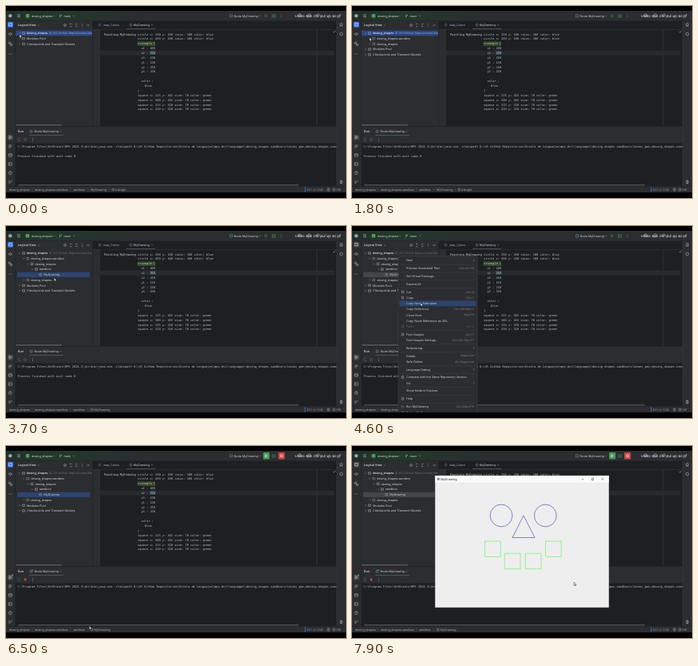
Animation, 426 px wide and 240 px high, one loop 8000 ms. Source, as an HTML page:

```html
<!DOCTYPE html>
<html lang="en">
<head>
<meta charset="utf-8">
<title>Shape editor session</title>
<style>
  html, body { margin: 0; width: 100%; height: 100%; overflow: hidden; background: #000; }
  svg { display: block; width: 100vw; height: 100vh; }
  text { font-family: Inter, Roboto, sans-serif; white-space: pre; text-rendering: geometricPrecision; }
  .mono { font-family: "DejaVu Sans Mono", "Noto Sans Mono", monospace; }
</style>
</head>
<body>
<svg id="stage" viewBox="0 0 426 240" preserveAspectRatio="none"></svg>
<script>
const LOOP = 8000, STEP = 100;
const PANEL = '#2b2d30', EDITOR = '#1e1f22', LINE = '#393b40';
const TEXT = '#cfd1d6', DIM = '#7d8087', GREEN = '#57a865', SOFT_GREEN = '#55805f';
const BLUE = '#2b4784', ROW_BLUE = '#2e436e', GRAY_SEL = '#43454a', ACCENT = '#3574f0', TAB = '#5b6472';

// Markup helpers; text is placed by its vertical centre.
const rect = (x, y, w, h, fill, extra = '') =>
  `<rect x="${x}" y="${y}" width="${w}" height="${h}" fill="${fill}" ${extra}/>`;
const path = (d, color = '#a9abb1', width = .6, extra = '') =>
  `<path d="${d}" fill="none" stroke="${color}" stroke-width="${width}" ${extra}/>`;
const dot = (x, y, r, fill) => `<circle cx="${x}" cy="${y}" r="${r}" fill="${fill}"/>`;
const ring = (x, y, r, color = '#a9abb1') =>
  `<circle cx="${x}" cy="${y}" r="${r}" fill="none" stroke="${color}" stroke-width=".6"/>`;
const text = (x, y, s, fill = TEXT, size = 3.7, extra = '') =>
  `<text x="${x}" y="${y + size * .36}" font-size="${size}" fill="${fill}" ${extra}>${s}</text>`;
const mono = (x, y, s, fill = '#bcbec4') => text(x, y, s, fill, 3.67, 'class="mono"');
const frame = (x, y, w = 4, h = 3.4, color) =>
  path(`M${x - w / 2} ${y - h / 2}h${w}v${h}h${-w}z`, color);
const chevron = (x, y, down, color = '#9a9ca3') =>
  path(down ? `M${x - 1.1} ${y - .5}l1.1 1.1 1.1 -1.1` : `M${x - .5} ${y - 1.1}l1.1 1.1 -1.1 1.1`, color, .5);
const dots = (x, y) => [-1.5, 0, 1.5].map(d => dot(x, y + d, .4, '#b5b7bd')).join('');
const play = (x, y) => path(`M${x - 1.3} ${y - 1.8}l3 1.8 -3 1.8z`, SOFT_GREEN);

function chrome() {
  let s = `<defs><linearGradient id="bar">
    <stop offset="0" stop-color="#232d28"/><stop offset=".12" stop-color="#22392b"/>
    <stop offset=".4" stop-color="${PANEL}"/></linearGradient>
    <clipPath id="side"><rect x="12" y="30" width="96" height="120"/></clipPath>
    <clipPath id="view"><rect x="0" y="6" width="426" height="227"/></clipPath>
    <clipPath id="log"><rect x="12" y="172" width="402" height="53"/></clipPath></defs>`;
  s += rect(0, 6, 426, 227, PANEL) + rect(0, 6, 426, 12.5, 'url(#bar)');
  s += rect(109, 19, 305, 10, EDITOR) + rect(118, 29, 296, 121, EDITOR) + rect(12, 171.5, 402, 53.5, EDITOR);
  s += rect(0, 18.3, 426, .5, EDITOR) + rect(11.4, 18.5, .5, 206.5, EDITOR) +
       rect(414, 18.5, .5, 206.5, LINE) + rect(108.4, 18.5, .6, 131.5, EDITOR) +
       rect(12, 150, 402, .6, EDITOR) + rect(0, 225, 426, .5, EDITOR) +
       rect(109, 29, 305, .4, LINE) + rect(389.3, 29.4, .6, 120.6, LINE);

  // Title bar
  s += dot(5.3, 12.3, 2.2, '#8fa8b8');
  s += path('M14 10.7h4M14 12.3h4M14 13.9h4', '#c5c7cc', .5);
  s += rect(24.7, 10, 4.6, 4.6, '#4c9a63', 'rx="1"') + text(32, 12.3, 'desing_shapes') + chevron(60, 12.3, true);
  s += path('M67.5 10.5v4M69.5 10.5v1.5l-2 1') + text(72.5, 12.3, 'main') + chevron(85, 12.3, true);
  s += frame(282, 12.3, 3, 3, '#6a8fb5') + text(285.5, 12.3, 'Node MyDrawing') + chevron(318, 12.3, true);
  s += ring(335.5, 12.5, 1.6, GREEN) + path('M333 11h1M337 11h1M333 14h1M337 14h1', GREEN);
  s += ring(368, 11.5, 1.7) + ring(380, 11.5, 1.7) + ring(391, 11.5, 1.6);
  s += text(362, 12.8, 'video eps chr pul up ao pf', '#f4f4f4', 4.7);

  // Tool stripes
  s += ring(5.3, 35, 1.4) + path('M2.6 35h1.3M6.7 35h1.3');
  s += frame(4.4, 46.2, 2, 2) + frame(6.5, 48.5, 2, 2);
  s += [3.8, 5.3, 6.8].map(x => dot(x, 60, .4, '#b5b7bd')).join('');
  s += rect(2, 160.7, 7, 7, GRAY_SEL, 'rx="1.4"') + path('M4.2 162.2l3 1.9 -3 1.9z', '#d5d7dc');
  s += path('M3.3 174h4M3.3 175.5h4M3.3 177h2.5') + frame(5.3, 186.5) + path('M3.3 186h4') +
       frame(5.3, 197.5) + path('M4 196.7l1 .8 -1 .8') + ring(5.3, 208.7, 1.9) + path('M5.3 207.3v1.7') +
       path('M4 218v4M6.8 218v1.5l-2.6 1.5');
  s += ring(420, 23, 1.5) + path('M418 25h4') + ring(420, 35, 1.8) + frame(420, 220, 2, 3.2, '#d5d7dc');

  // Project header and editor tabs
  s += text(15, 24, 'Logical View', TEXT, 3.7, 'font-weight="600"') + chevron(41, 24, true);
  s += ring(74, 24, 1.4) + path('M80 23l1.2 -1.2 1.2 1.2M80 25l1.2 1.2 1.2 -1.2') +
       path('M87 22l1.2 1.2 1.2 -1.2M87 26l1.2 -1.2 1.2 1.2') + dots(95.5, 24) + path('M101.5 24h3');
  s += rect(12, 148, 58, 1.8, '#505257', 'rx=".8"');
  s += ring(117.5, 23.7, 1.4, '#6485ae') + text(122, 23.7, 'map_Canvo', '#a5a8af');
  s += ring(156.5, 23.7, 1.4, '#8a8d94') + text(159.8, 23.7, 'MyDrawing') +
       path('M182 22.7l2 2M184 22.7l-2 2', DIM, .4) + rect(151, 28.2, 36, .7, TAB);
  return s + source() + path('M410 32l1 1.2 2 -2.6', GREEN, .7);
}

function source() {
  const circle = x => `circle x: ${x} y: 100 raius: 100 color: blue`;
  const square = (x, y) => `square x: ${x} y: ${y} size: 70 color: green`;
  const points = ['x1 : 400', 'x2 : 350', 'x3 : 450', 'y1 : 150', 'y2 : 250', 'y3 : 250'];
  const rows = [circle(250), circle(450), 'triangle {', ...points.map(p => '  ' + p), '',
    '  color :', '    blue', '}', square(225, 265), square(500, 265), square(315, 320), square(410, 320)];
  let s = rect(118, 55.7, 293, 5.8, '#262a2f') + rect(164.6, 44.4, 22.4, 5.6, '#35472f') +
          rect(180.2, 56, 7.2, 5, '#36464f');
  s += mono(123, 35.2, 'Painting MyDrawing', '#d6d8dd');
  rows.forEach((r, i) => s += mono(165, 35.2 + 5.87 * i, r, i === 2 ? '#c8d79a' : undefined));
  return s;
}

function tree(t, focused) {
  const open = [700, 2000, 2500, 3000].map(at => t >= at);
  const picked = t >= 3400;
  const rows = [[0, 'desing_shapes', open[0]]];
  if (open[0]) rows.push([1, 'desing_shapes.sandbox', open[1]]);
  if (open[1]) rows.push([2, 'desing_shapes', open[2]]);
  if (open[2]) rows.push([3, 'sandbox', open[3]]);
  if (open[3]) rows.push([4, 'MyDrawing', null]);
  if (open[0]) rows.push([1, 'desing_shapes', false]);
  rows.push([0, 'Modules Pool', false], [0, 'Checkpoints and Transient Models', false]);
  let s = '';
  rows.forEach(([level, label, expanded], i) => {
    const x = 17 + 5.3 * level, y = 34 + 6.7 * i;
    if (!picked && i === 0) s += rect(12, y - 3.3, 96, 6.6, BLUE);
    if (picked && level === 4) s += rect(14, y - 3.1, 91, 6.2, focused ? ROW_BLUE : GRAY_SEL, 'rx="1"');
    if (expanded !== null) s += chevron(x, y, expanded);
    s += level === 4 ? ring(x + 5, y, 1.4) : frame(x + 5, y, 2.8, 2.4, level === 1 ? '#a98a78' : undefined);
    s += i ? text(x + 9, y, label)
      : text(x + 8.7, y, `<tspan font-weight="600">${label}</tspan><tspan fill="${picked ? '#6a6d74' : '#93a3c6'}"> (D:\\VS GitHub Repositories\\desing_shapes)</tspan>`);
  });
  return `<g clip-path="url(#side)">${s}</g>`;
}

function toolbar(running, focused) {
  let s = rect(2, 19.7, 7, 7, focused ? ACCENT : GRAY_SEL, 'rx="1.4"') + frame(5.5, 23.2, 3.6, 3, '#e4e6ea');
  if (running) {
    s += rect(322.2, 8, 8, 8.4, '#4b9a59', 'rx="1.2"') + path('M325 10.6l2.6 1.7 -2.6 1.7z', '#fff');
    s += rect(341.2, 8, 8, 8.4, '#d04a4c', 'rx="1.2"') + frame(345.2, 12.3, 2.4, 2.4, '#fff');
  } else s += play(326, 12.3) + dots(345, 12.3);
  return s;
}

function runPanel(running) {
  const command = 'C:\\Program Files\\JetBrains\\MPS 2024.3\\jbr\\bin\\java.exe -classpath D:\\VS GitHub Repositories\\Escola de Lenguajes\\mps.dsl\\languages\\desing_shapes.sandbox\\classes_gen;desing_shapes.sandbox';
  let s = text(15, 156.7, 'Run', TEXT, 3.7, 'font-weight="600"');
  s += frame(31.5, 156.7, 2.6, 2.6, '#6a8fb5') + text(35.5, 156.7, 'Node MyDrawing') +
       path('M67.5 155.7l2 2M69.5 155.7l-2 2', DIM, .4) + rect(29, 161.2, 43, .7, TAB);
  s += path('M18 165.7a1.8 1.8 0 1 0 .3 2', SOFT_GREEN) + dots(33.5, 167);
  s += running ? rect(22.7, 165.6, 2.8, 2.8, '#b04a4a', 'rx=".5"') : frame(24, 167, 2.6, 2.6, '#66696f');
  if (running) s += dot(33, 155, .8, GREEN) + dot(8, 161.5, 1, GREEN);
  s += `<g clip-path="url(#log)">${mono(14.5, 175.8, command)}</g>`;
  if (!running) s += mono(14.5, 187.5, 'Process finished with exit code 0');
  return s + rect(15, 223, 352, 1.4, '#4a4c51', 'rx=".7"');
}

// The innermost breadcrumb carries a node icon.
function statusBar(t) {
  const crumbs = [[4, 'desing_shapes'], [36, 'desing_shapes.sandbox'], [84, 'sandbox'], [106, 'MyDrawing']];
  if (t < 3400) crumbs.push([132.5, 'triangle']);
  let s = '';
  crumbs.forEach(([x, label], i) => {
    const last = i === crumbs.length - 1;
    if (i) s += chevron(x - 3.3, 229.5, false, DIM);
    if (last) s += ring(x + 1.7, 229.5, 1.3);
    s += text(last ? x + 4.5 : x, 229.5, label, '#a9acb3');
  });
  s += rect(374, 226.5, 1.6, 6, '#35569c') + text(377, 229.5, '827 of 1038', '#8f939b', 3.6);
  return s + frame(404, 229.5, 2.2, 2.8) + ring(411, 229.5, 1.4) + text(414, 229.5, 'Off', '#a9acb3');
}

// Each item: centre y, label, shortcut ('>' marks a submenu)
const MENU = [
  [43, 'New', '>'], [53, 'Preview Generated Text', 'Ctrl+Alt+F9'], [62.7, 'Set Virtual Package...'],
  [72.5, 'Expand All'], [82.3, 'Cut', 'Ctrl+X'], [89.5, 'Copy', 'Ctrl+C'], [96.8, 'Copy Node Pathname'],
  [104, 'Copy Reference', 'Ctrl+Alt+Maj+C'], [111.2, 'Clone Root', 'Maj+F5'],
  [118.5, 'Copy Node Reference as URL'], [125.7, 'Paste', 'Ctrl+V'], [135.5, 'Find Usages', 'Alt+F7'],
  [142.7, 'Find Usages Settings...', 'Ctrl+Alt+Maj+F7'], [152.5, 'Refactoring', '>'],
  [162.2, 'Delete', 'Supprimer'], [169.5, 'Safe Delete', 'Alt+Supprimer'], [179.2, 'Language Debug', '>'],
  [189, 'Compare with the Same Repository Version'], [196.2, 'Git', '>'],
  [206, 'Show Node in Explorer'], [216, 'Help'], [226, 'Run MyDrawing', 'Ctrl+Maj+F10'], [233.2, 'Debug MyDrawing']
];
const MENU_ICONS = ['Cut', 'Copy', 'Paste', 'Find Usages', 'Compare with the Same Repository Version', 'Help'];

function menu(x, y) {
  let s = rect(58, 37.5, 99, 200, PANEL, `stroke="${GRAY_SEL}" stroke-width=".5" rx="1"`);
  MENU.forEach(([cy, label, key], i) => {
    const off = label === 'Paste';
    if (i && cy - MENU[i - 1][0] > 9) s += rect(61, (cy + MENU[i - 1][0]) / 2, 93, .4, '#404247');
    if (x > 59 && Math.abs(y - cy) < 3.6) s += rect(59.5, cy - 3.5, 96, 7, ROW_BLUE, 'rx="1"');
    if (MENU_ICONS.includes(label)) s += frame(63.5, cy, 2.4, 2.6, off ? '#5a5d63' : undefined);
    if (label === 'Run MyDrawing') s += play(63.5, cy);
    if (label === 'Debug MyDrawing') s += ring(63.5, cy, 1.4, GREEN);
    s += text(68, cy, label, off ? '#606369' : TEXT);
    if (key === '>') s += chevron(152.5, cy, false);
    else if (key) s += text(153, cy, key, off ? '#55585e' : DIM, 3.5, 'text-anchor="end"');
  });
  return `<g clip-path="url(#view)">${s}</g>`;
}

function drawingWindow(t) {
  const [scale, alpha] = t < 6700 ? [.95, .6] : t < 6800 ? [.991, 1] : [1, 1];
  let s = rect(104, 37, 218, 165, '#eeeeee', 'stroke="#55575b" stroke-width=".5"') + rect(104.2, 37.2, 217.6, 8.6, '#fafafa');
  s += rect(106.7, 39.8, 3, 3, '#7c8aa0') + text(111, 41.5, 'MyDrawing', '#222', 3.8);
  s += path('M288 41.5h2.4', '#333', .5) + frame(301.5, 41.5, 2.2, 2.2, '#444') +
       path('M313 40.4l2.2 2.2M315.2 40.4l-2.2 2.2', '#333', .5);
  const ink = '#3a3ab8';
  s += ring(187, 87, 13.9, ink) + ring(242.3, 87, 13.9, ink) + path('M215 87L201 114.5H229Z', ink);
  [[166.5, 119], [242.5, 119], [191.3, 134.3], [217.3, 134.3]].forEach(([x, y]) =>
    s += path(`M${x} ${y}h19.7v19.4h-19.7z`, '#5cf05c'));
  return `<g opacity="${alpha}" transform="translate(213 119.5) scale(${scale}) translate(-213 -119.5)">${s}</g>`;
}

// Pointer track: time, x, y of the tip
const TRACK = [[0, 17, 35.5], [500, 16, 33], [1000, 16, 33], [1600, 22, 39.5], [2000, 22, 39.5], [2400, 28, 46],
  [2600, 28, 46], [2900, 33, 53], [3100, 33, 53], [3400, 58, 60], [3700, 60.3, 64.8], [4000, 58, 61],
  [4200, 58, 61], [4600, 86, 96], [5400, 90, 225], [5700, 90, 225], [6200, 104.3, 225], [6800, 104.3, 225],
  [7700, 278, 170], [8000, 278, 170]];

function pointer(t) {
  const i = TRACK.findIndex((k, n) => n && t < k[0]);
  const [t0, x0, y0] = TRACK[i - 1], [t1, x1, y1] = TRACK[i];
  const p = (t - t0) / (t1 - t0), e = p * p * (3 - 2 * p);
  return [x0 + (x1 - x0) * e, y0 + (y1 - y0) * e];
}
const arrow = (x, y) =>
  `<path d="M${x} ${y}v4.2l1 -.9 .7 1.6 .7 -.3 -.7 -1.5h1.3z" fill="#fff" stroke="#000" stroke-width=".4"/>`;

const stage = document.getElementById('stage');
stage.innerHTML = chrome() + '<g id="live"></g>';
const live = document.getElementById('live');

function render(t) {
  const [x, y] = pointer(t);
  const menuOpen = t >= 4100 && t < 5700, running = t >= 6200, shown = t >= 6600;
  const focused = !menuOpen && !shown;
  live.innerHTML = toolbar(running, focused) + tree(t, focused) + runPanel(running) + statusBar(t) +
    (menuOpen ? menu(x, y) : '') + (shown ? drawingWindow(t) : '') + arrow(x, y);
}

const start = performance.now();
let last = -1;
function tick() {
  const t = Math.floor((performance.now() - start) % LOOP / STEP) * STEP;
  if (t !== last) render(last = t);
  requestAnimationFrame(tick);
}
tick();
</script>
</body>
</html>
```
